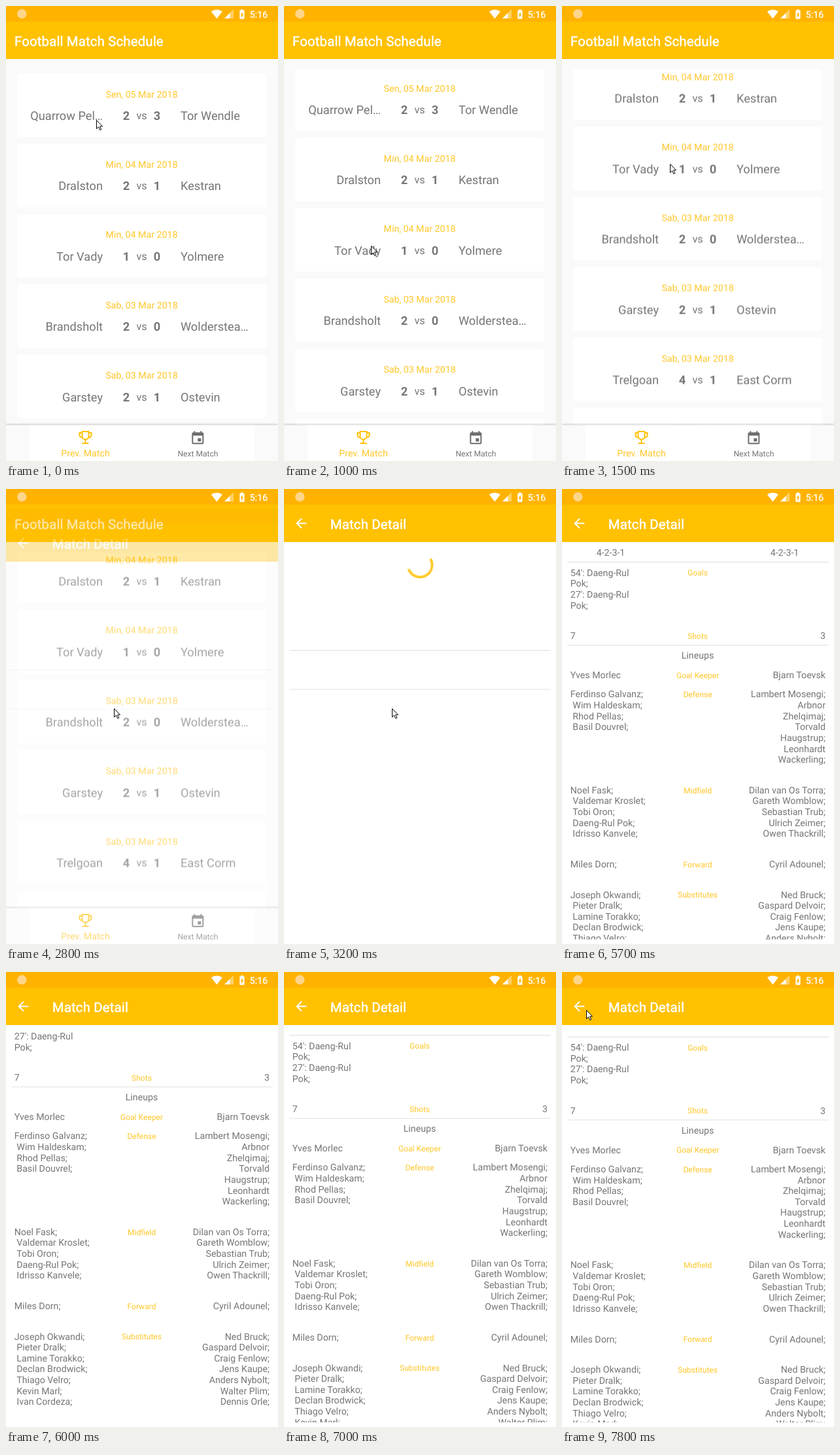
These frames come from a looping animation (416x695 px, 8 s). An HTML page:

```html
<!DOCTYPE html>
<html lang="en">
<head>
<meta charset="utf-8">
<title>Football Match Schedule</title>
<style>
  html, body { margin: 0; width: 100%; height: 100%; overflow: hidden; background: #fafafa; }
  svg { display: block; width: 100%; height: 100%; }
  text { font: 14.2px Roboto, sans-serif; fill: #757575; text-rendering: geometricPrecision; }
  .mid { text-anchor: middle; }
  .end { text-anchor: end; }
  .accent { fill: #ffc628; }
  .small { font-size: 12.1px; }
  .vs { font-size: 16.2px; }
  .team { font-size: 18.2px; }
  .bold { font-weight: 700; }
  .big { font-size: 40.4px; }
  /* A thin stroke gives the regular weight a medium look. */
  .title { font-size: 20.4px; letter-spacing: .15px; fill: #fff; stroke: #fff; stroke-width: .5; }
  .clock { fill: #fff; stroke: #fff; stroke-width: .35; }
  .rule { stroke: #e2e2e2; stroke-width: 1.2; }

  /* One loop is 8 s, so 1.25% is one 100 ms step. */
  #list, #detail, #page, #loaded, #waiting, #ring, #arc, #cursor {
    animation: 8s step-end infinite;
  }
  #list { animation-name: list; }
  #detail { animation-name: open; }
  #page { animation-name: page; }
  #loaded { animation-name: appear; }
  #waiting { animation-name: vanish; }
  #ring { animation-name: turn, ring; transform-origin: 208px 116px; }
  #arc { animation-name: trim; fill: none; stroke: #ffca28; stroke-width: 4; }
  #cursor { animation-name: move, cursor; }

  @keyframes list {
    0% { transform: translateY(0); }
    10% { transform: translateY(0); }
    11.25% { transform: translateY(-2px); }
    12.5% { transform: translateY(-9px); }
    13.75% { transform: translateY(-27px); }
    15% { transform: translateY(-57px); }
    16.25% { transform: translateY(-89.5px); }
    17.5% { transform: translateY(-121px); }
    18.75%, 100% { transform: translateY(-133.5px); }
  }
  @keyframes open {
    0% { opacity: 0; transform: translateY(55px); }
    35% { opacity: .35; transform: translateY(30px); }
    36.25% { opacity: .9; transform: translateY(10px); }
    37.5% { opacity: 1; transform: translateY(2px); }
    38.75%, 100% { opacity: 1; transform: none; }
  }
  @keyframes page {
    0% { transform: translateY(0); }
    67.5% { transform: translateY(0); animation-timing-function: steps(3); }
    71.25% { transform: translateY(-135px); animation-timing-function: steps(3); }
    75% { transform: translateY(-198px); }
    83.75% { transform: translateY(-198px); animation-timing-function: steps(3); }
    87.5% { transform: translateY(-150px); }
    90%, 100% { transform: translateY(-147.5px); }
  }
  @keyframes appear { 0% { opacity: 0; } 56.25%, 100% { opacity: 1; } }
  @keyframes vanish { 0% { opacity: 1; } 56.25%, 100% { opacity: 0; } }
  @keyframes ring { 0% { opacity: 1; } 65%, 100% { opacity: 0; } }
  @keyframes turn {
    0% { transform: rotate(-99deg); }
    36.25% { transform: rotate(-99deg); animation-timing-function: steps(16); }
    56.24% { transform: rotate(268deg); }
    56.25% { transform: rotate(-90deg); animation-timing-function: steps(7); }
    65%, 100% { transform: rotate(71deg); }
  }
  @keyframes trim {
    0% { stroke-dasharray: 0 100; stroke-dashoffset: 0; }
    36.25% { stroke-dasharray: 0 100; stroke-dashoffset: 0; animation-timing-function: cubic-bezier(.4, 0, .2, 1); }
    44.58% { stroke-dasharray: 75 100; stroke-dashoffset: 0; animation-timing-function: cubic-bezier(.4, 0, .2, 1); }
    52.92% { stroke-dasharray: 0 100; stroke-dashoffset: -75; animation-timing-function: ease-in; }
    56.24% { stroke-dasharray: 23 100; stroke-dashoffset: -75; }
    56.25% { stroke-dasharray: 0 100; stroke-dashoffset: 0; animation-timing-function: cubic-bezier(.4, 0, .2, 1); }
    64.58%, 100% { stroke-dasharray: 75 100; stroke-dashoffset: 0; }
  }
  @keyframes move {
    0% { transform: translate(138px, 174px); }
    2.5% { transform: translate(138px, 174px); animation-timing-function: steps(3); }
    6.25% { transform: translate(127px, 391px); }
    8.75% { transform: translate(127px, 391px); animation-timing-function: steps(3); }
    12.5% { transform: translate(133px, 366px); }
    13.75% { transform: translate(139px, 348px); }
    15% { transform: translate(146px, 318px); }
    16.25% { transform: translate(153px, 286px); }
    17.5% { transform: translate(160px, 254px); }
    18.75% { transform: translate(165px, 241px); }
    20% { transform: translate(165px, 242px); animation-timing-function: steps(7); }
    28.75% { transform: translate(165px, 335px); }
    68.75% { transform: translate(2px, 0); }
    91.25% { transform: translate(2px, 0); animation-timing-function: steps(3); }
    95% { transform: translate(37px, 53px); animation-timing-function: steps(2); }
    97.5%, 100% { transform: translate(37px, 58px); }
  }
  @keyframes cursor { 0% { opacity: 1; } 68.75% { opacity: 0; } 91.25%, 100% { opacity: 1; } }
</style>
</head>
<body>
<svg viewBox="0 0 416 695" xmlns="http://www.w3.org/2000/svg">
  <defs>
    <clipPath id="listBox"><rect y="97" width="416" height="543"/></clipPath>
    <clipPath id="pageBox"><rect y="91" width="416" height="597"/></clipPath>
    <linearGradient id="shade" x2="0" y2="1">
      <stop offset="0" stop-color="#000" stop-opacity="0"/>
      <stop offset="1" stop-color="#000" stop-opacity=".16"/>
    </linearGradient>
  </defs>

  <rect width="416" height="695" fill="#fafafa"/>
  <g clip-path="url(#listBox)"><g id="list"></g></g>
  <rect width="416" height="24" fill="#ffb300"/>
  <rect y="24" width="416" height="57" fill="#ffc100"/>
  <text class="title" x="13" y="60.5">Football Match Schedule</text>

  <rect y="636.5" width="416" height="4" fill="url(#shade)"/>
  <rect y="640.5" width="416" height="55" fill="#fafafa"/>
  <rect x="36" y="640.5" width="344" height="55" fill="#fff"/>
  <g transform="translate(109.5 647)" fill="none" stroke="#ffc107" stroke-width="2">
    <path d="M7 3H17V10.5A5 4.5 0 0 1 7 10.5ZM7 5H3V8.5A3.5 3.5 0 0 0 7 12M17 5H21V8.5A3.5 3.5 0 0 1 17 12M12 15V20M7 21H17"/>
  </g>
  <text class="mid accent" x="121.5" y="687.5">Prev. Match</text>
  <path transform="translate(281.3 648.3)" fill="#6e6e6e" d="M17 12h-5v5h5zM16 1v2H8V1H6v2H5a2 2 0 0 0-2 2V19a2 2 0 0 0 2 2h14a2 2 0 0 0 2-2V5a2 2 0 0 0-2-2h-1V1zM19 19H5V8h14z"/>
  <text class="mid small" x="293.5" y="687.8">Next Match</text>

  <g id="detail">
    <rect width="416" height="695" fill="#fff"/>
    <rect width="416" height="24" fill="#ffb300"/>
    <rect y="24" width="416" height="57" fill="#ffc100"/>
    <path transform="translate(14.2 40.4) scale(1.011)" fill="#fff" d="M20 11H7.83l5.59-5.59L12 4l-8 8 8 8 1.41-1.41L7.83 13H20z"/>
    <text class="title" x="70.8" y="60.5">Match Detail</text>
    <g clip-path="url(#pageBox)">
      <g id="page">
        <path class="rule" d="M8 246.7H408"/>
        <path id="waiting" class="rule" d="M8 306H408"/>
        <g id="loaded"><path class="rule" d="M8 373.5H408"/></g>
      </g>
    </g>
    <g id="ring"><circle id="arc" cx="208" cy="116" r="18.5" pathLength="100"/></g>
  </g>

  <circle cx="24.3" cy="12" r="7.2" fill="#ffd58a"/>
  <g fill="#fff">
    <path transform="translate(313.6 3.5) scale(.73)" d="M12 21.5L23.64 7C23.2 6.66 18.7 3 12 3S.8 6.66.36 7Z"/>
    <g transform="translate(332.6 3.7) scale(.7)">
      <path d="M2 22H22V2Z" opacity=".4"/>
      <path d="M2 22H14V10Z"/>
    </g>
    <path transform="translate(352.2 3.7) scale(.73)" fill-rule="evenodd" d="M15.7 4H14V2H10V4H8.3Q7 4 7 5.3V20.7Q7 22 8.3 22H15.7Q17 22 17 20.7V5.3Q17 4 15.7 4ZM11 20V14.5H9L13 7V12.5H15Z"/>
  </g>
  <text class="clock" x="372.8" y="17.6">5:16</text>

  <path id="cursor" d="M.5 .5V13.5L3.5 10.7L5.8 15.5L7.8 14.6L5.6 9.9H9.5Z" fill="#fff" stroke="#000"/>
</svg>

<script>
  const NS = 'http://www.w3.org/2000/svg';
  const LINE = 16.64;

  function add(parent, tag, attrs, label = '') {
    const node = document.createElementNS(NS, tag);
    for (const key in attrs) node.setAttribute(key, attrs[key]);
    node.textContent = label;
    parent.append(node);
  }
  const write = (parent, x, y, label, style = '') =>
    add(parent, 'text', { x, y, class: style }, label);

  const matches = [
    ['Sen, 05', 'Quarrow Pel…', 2, 3, 'Tor Wendle'],
    ['Min, 04', 'Dralston', 2, 1, 'Kestran'],
    ['Min, 04', 'Tor Vady', 1, 0, 'Yolmere'],
    ['Sab, 03', 'Brandsholt', 2, 0, 'Wolderstea…'],
    ['Sab, 03', 'Garstey', 2, 1, 'Ostevin'],
    ['Sab, 03', 'Trelgoan', 4, 1, 'East Corm'],
    ['Sab, 03', 'Felmosa', 2, 0, 'Norbeck']
  ];
  const list = document.getElementById('list');
  matches.forEach(([day, home, a, b, away], i) => {
    const y = 103 + i * 107.4;
    add(list, 'rect', { x: 17, y, width: 381, height: 97, rx: 4.5, fill: '#fff' });
    write(list, 207.5, y + 36.6, day + ' Mar 2018', 'mid accent');
    write(list, 148, y + 71, home, 'end team');
    write(list, 184, y + 71, a, 'mid team bold');
    write(list, 207.5, y + 70, 'vs', 'mid vs');
    write(list, 231, y + 71, b, 'mid team bold');
    write(list, 267, y + 71, away, 'team');
  });

  const page = document.getElementById('loaded');
  write(page, 207.5, 112, 'Sab, 03 Mar 2018', 'mid accent');
  write(page, 176.5, 174.7, 2, 'mid big bold');
  write(page, 207.3, 166, 'vs', 'mid team');
  write(page, 238.5, 174.7, 0, 'mid big bold');
  write(page, 74.5, 217, 'Brandsholt', 'mid team accent');
  write(page, 340.5, 217, 'Wolderstead …', 'mid team accent');
  write(page, 74.5, 237.3, '4-2-3-1', 'mid');
  write(page, 340.5, 237.3, '4-2-3-1', 'mid');
  write(page, 207.5, 394, 'Lineups', 'mid');

  // A leading space in a left line indents it slightly.
  const sections = [
    [267.7, 'Goals', "54': Daeng-Rul|Pok;|27': Daeng-Rul|Pok;", ''],
    [364, 'Shots', '7', '3'],
    [424, 'Goal Keeper', 'Yves Morlec', 'Bjarn Toevsk'],
    [453.4, 'Defense', 'Ferdinso Galvanz;| Wim Haldeskam;| Rhod Pellas;| Basil Douvrel;',
      'Lambert Mosengi;|Arbnor|Zhelqimaj;|Torvald|Haugstrup;|Leonhardt|Wackerling;'],
    [599.8, 'Midfield', 'Noel Fask;| Valdemar Kroslet;| Tobi Oron;| Daeng-Rul Pok;| Idrisso Kanvele;',
      'Dilan van Os Torra;|Gareth Womblow;|Sebastian Trub;|Ulrich Zeimer;|Owen Thackrill;'],
    [713, 'Forward', 'Miles Dorn;', 'Cyril Adounel;'],
    [759.5, 'Substitutes',
      'Joseph Okwandi;| Pieter Dralk;| Lamine Torakko;| Declan Brodwick;| Thiago Velro;| Kevin Marl;| Ivan Cordeza;',
      'Ned Bruck;|Gaspard Delvoir;|Craig Fenlow;|Jens Kaupe;|Anders Nybolt;|Walter Plim;|Dennis Orle;']
  ];
  for (const [y, label, left, right] of sections) {
    write(page, 207.5, y - .3, label, 'mid small accent');
    left.split('|').forEach((s, i) =>
      write(page, s[0] === ' ' ? 16.3 : 12.7, y + i * LINE, s.trim()));
    right.split('|').forEach((s, i) => write(page, 403, y + i * LINE, s, 'end'));
  }
</script>
</body>
</html>
```
